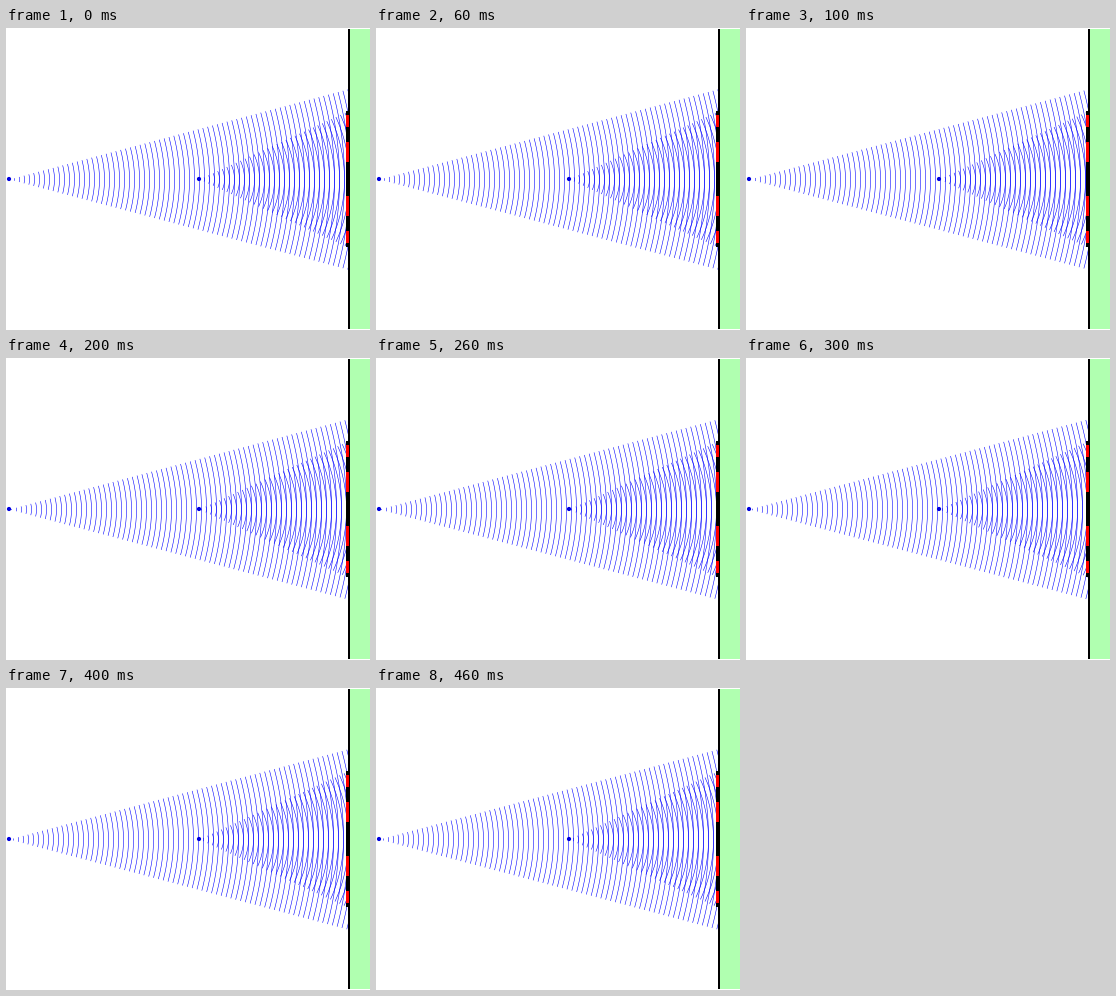
Animation of 364x302 px, one loop 0.5 s. Source, as a matplotlib script:

```python
import matplotlib.pyplot as plt
import numpy as np
from matplotlib.animation import FuncAnimation
from matplotlib.collections import LineCollection
from matplotlib.patches import Circle, Rectangle

W, H, DPI = 364, 302, 100
FRAMES, INTERVAL = 5, 100
SPACING = 5
WALL_X, MID_Y = 342, 151
PX = 72 / DPI
# x position and half opening angle in degrees
EMITTERS = [(3, 14.9), (193, 24.6)]
RED_BANDS = [(17, 37), (52, 64)]

fig = plt.figure(figsize=(W / DPI, H / DPI), dpi=DPI, facecolor="white")
ax = fig.add_axes([0, 0, 1, 1])
ax.set_xlim(0, W)
ax.set_ylim(H, 0)
ax.axis("off")


def box(x0, y0, x1, y1, color, z):
    ax.add_patch(Rectangle((x0, y0), x1 - x0, y1 - y0, fc=color, lw=0,
                           antialiased=False, zorder=z))


def arcs(x, half_angle, shift):
    """Concentric wavefronts up to the wall, pushed outward by shift."""
    t = np.radians(np.linspace(-half_angle, half_angle, 61))
    reach = (WALL_X - x) / np.cos(t[0])
    radii = np.arange(SPACING + shift, reach + SPACING, SPACING)
    if shift >= 2:
        radii = np.insert(radii, 0, shift)
    return [np.column_stack([x + 0.5 + r * np.cos(t), MID_Y + 0.5 + r * np.sin(t)])
            for r in radii]


box(343, 1, 364, 301, "#b0ffb0", 3)
box(342, 1, 343.6, 301, "black", 4)
box(340, 83, 343, 219, "black", 5)
for near, far in RED_BANDS:
    box(340, MID_Y - far, 343, MID_Y - near, "red", 6)
    box(340, MID_Y + near, 343, MID_Y + far, "red", 6)
for x, _ in EMITTERS:
    ax.add_patch(Circle((x, MID_Y), 2.1, fc="#0000e0", lw=0, zorder=7))

waves = LineCollection([], colors="#0000ff", linewidths=0.55 * PX, zorder=2)
ax.add_collection(waves)
waves.set_clip_path(Rectangle((0, 0), WALL_X, H, transform=ax.transData))


def draw(i):
    shift = i % SPACING
    waves.set_segments([a for x, angle in EMITTERS for a in arcs(x, angle, shift)])
    return [waves]


anim = FuncAnimation(fig, draw, frames=FRAMES, interval=INTERVAL,
                     repeat=True, repeat_delay=0)
plt.show()
```
